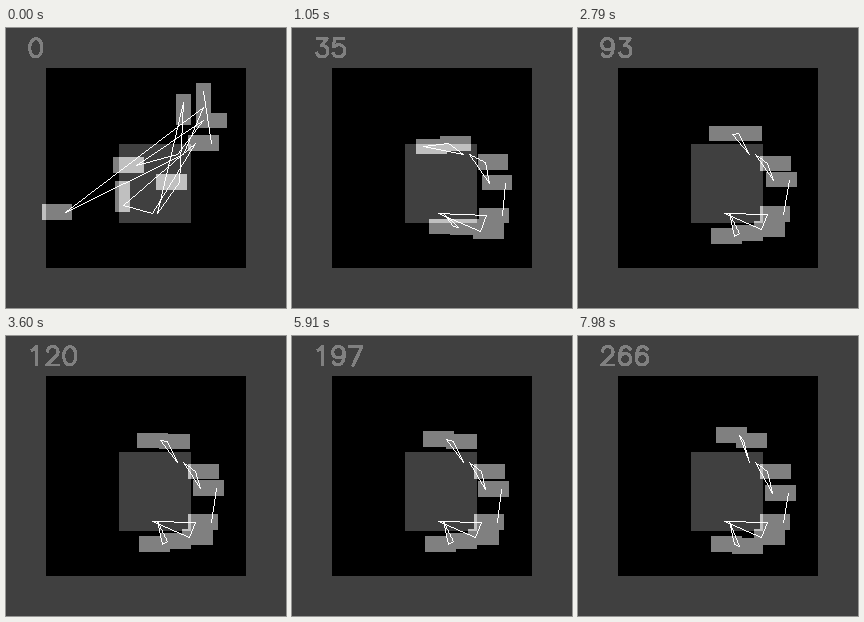
Recreate the animation shown at these times as a matplotlib script. Size 280 px wide and 280 px high, loop 8000 ms.

```python
import numpy as np
import matplotlib
import matplotlib.pyplot as plt
from matplotlib.animation import FuncAnimation

matplotlib.rcParams["toolbar"] = "None"

SIZE, DPI = 280, 100
LOOP, TICK, STEP = 8000, 20, 30      # ms: loop, redraw interval, solver step
STEPS = 267
SPREAD, SETTLED, COOLED, STIRRED = 16, 66, 150, 235   # solver phases
LONG, SHORT, REACH = 30.8, 15.4, 8   # part size, pin distance from centre

# Each part: (x, y[, quarter turns]) at the start, once spread out, at rest
PARTS = dict(
    A=[(107, 129), (86, 184, 2), (131, 95)],
    B=[(190, 84.4), (132, 185), (153.7, 97.4)],
    C=[(35.6, 176, 2), (190, 128), (182, 127.4)],
    D=[(189.6, 55, 1), (190, 142), (186, 145)],
    E=[(182, 107), (183, 173), (181.6, 178)],
    F=[(109, 153, 1), (175, 191), (176, 193)],
    G=[(169.6, 66, 1), (152, 140), (133, 200)],
    H=[(150, 146, 2), (183, 162), (154, 197)],
)
# Loose parts: offset still left when settled, offset gained at the end
DRIFT = dict(A=[(0, 4), (7, -4)], B=[(-1, 0), (4, -1)],
             D=[(3, -2), (1, 4)], H=[(0, 0), (0, 5)])

# Nets join fixed pins (points) and part pins (name + pin number)
NETS = [
    [(171, 126), "A2", "B1"],
    [(177, 126), "C1", "D1"],
    ["D2", "E2"],
    [(146, 185), "E1", "F1"],
    [(151, 185), "G2", "H1"],
]


def ramp(s, a, b):
    return float(np.clip((s - a) / (b - a), 0, 1))


def build_path(name, rng):
    """Pose of one part at every step: big hops first, then ever smaller ones."""
    start, spread, rest = [np.array((*p, 0)[:3], float) for p in PARTS[name]]
    left, gained = np.array(DRIFT.get(name, [(0, 0), (0, 0)]))
    path = np.empty((STEPS, 3))
    for s in range(STEPS):
        if s < SPREAD:
            t = s / SPREAD
            a, b, ease, heat = start, spread, t, 14
        else:
            t = ramp(s, SPREAD, SETTLED)
            a, b, ease, heat = spread, rest, 1 - (1 - t) ** 4, 12 * (1 - t) ** 3
        pos = a[:2] + (b[:2] - a[:2]) * ease
        pos = pos + left * t * (s >= SPREAD) * (1 - ramp(s, SETTLED, COOLED))
        pos = pos + gained * ramp(s, STIRRED, STEPS - 1)
        hop = rng.normal(0, 1, 2) * heat * np.sin(np.pi * t)
        path[s] = *(pos + hop), (a if t < 0.4 else b)[2]
    # pixel fraction that decides how a part's edges round
    path[:, :2] += (0.5, 0.7)
    return path


rng = np.random.default_rng(5)
PATHS = {name: build_path(name, rng) for name in PARTS}


def part_box(name, step):
    x, y, turn = PATHS[name][step]
    w, h = (SHORT, LONG) if turn % 2 else (LONG, SHORT)
    return x, y, w, h, int(turn)


def pin_at(ref, step):
    if not isinstance(ref, str):
        return ref
    x, y, w, h, turn = part_box(ref[0], step)
    dx, dy = [(-1, 0), (0, 1), (1, 0), (0, -1)][turn]
    reach = REACH if ref[1] == "1" else -REACH
    return int(x + w / 2 + dx * reach), int(y + h / 2 + dy * reach)


def draw_line(img, a, b):
    n = max(abs(b[0] - a[0]), abs(b[1] - a[1]), 1)
    xs = np.rint(np.linspace(a[0], b[0], n + 1)).astype(int)
    ys = np.rint(np.linspace(a[1], b[1], n + 1)).astype(int)
    img[ys, xs] = 255


BOARD = np.full((SIZE, SIZE), 64)
BOARD[40:240, 40:240] = 0
BOARD[116:195, 113:185] = 64


def render(step):
    cover = np.zeros((SIZE, SIZE), bool)
    for name in PARTS:
        x, y, w, h, _ = part_box(name, step)
        cover[int(y):int(y + h), int(x):int(x + w)] = True
    img = BOARD + 128 * cover
    for net in NETS:
        pts = [pin_at(ref, step) for ref in net]
        for a, b in zip(pts, pts[1:] + pts[:1]):
            draw_line(img, a, b)
    return img


# Single-stroke digits on a 20 x 21 cell, y upwards
def arc(cx, cy, rx, ry, a0=90, a1=-270):
    a = np.radians(np.linspace(a0, a1, 17))
    return np.column_stack([cx + rx * np.cos(a), cy + ry * np.sin(a)])


def stroke(*pieces):
    return np.vstack([np.atleast_2d(p) for p in pieces])


GAP = (np.nan, np.nan)
SIX = stroke(arc(11, 10.5, 7, 10.5, 45, 180), arc(10.5, 6.5, 6.5, 6.5, 180, -180))
DIGITS = [
    arc(10, 10.5, 7, 10.5),
    stroke((6, 17), (8, 18), (11, 21), (11, 0)),
    stroke(arc(10, 15, 6, 6, 170, -35), (3, 0), (17, 0)),
    stroke((5, 21), (16, 21), (10, 13), arc(10.5, 6.5, 6.5, 6.5, 90, -160)),
    stroke((13, 0), (13, 21), (3, 7), (18, 7)),
    stroke((15, 21), (5, 21), (4, 12), arc(10, 7, 7, 7, 140, -155)),
    SIX,
    stroke((3, 21), (17, 21), (7, 0)),
    stroke(arc(10, 16.5, 6, 4.5), GAP, arc(10, 6, 7, 6)),
    np.array([20, 21]) - SIX,
]


def number_path(n, x=21, base=29, scale=0.88, advance=17):
    rows = []
    for i, ch in enumerate(str(n)):
        g = DIGITS[int(ch)] * scale
        rows += [np.column_stack([x + advance * i + g[:, 0], base - g[:, 1]]), [GAP]]
    return np.vstack(rows)


fig = plt.figure(figsize=(SIZE / DPI, SIZE / DPI), dpi=DPI)
ax = fig.add_axes([0, 0, 1, 1])
ax.axis("off")
view = ax.imshow(render(0), cmap="gray", vmin=0, vmax=255, aspect="auto",
                 interpolation="nearest", extent=(0, SIZE, SIZE, 0))
counter, = ax.plot([], [], color="#808080", lw=2 * 72 / DPI, antialiased=False)
ax.set_xlim(0, SIZE)
ax.set_ylim(SIZE, 0)


def update(k):
    step = min((k * TICK + TICK // 2) // STEP, STEPS - 1)
    view.set_data(render(step))
    counter.set_data(*number_path(step).T)
    return view, counter


anim = FuncAnimation(fig, update, frames=LOOP // TICK, interval=TICK,
                     init_func=lambda: update(0), repeat=True, repeat_delay=0)
plt.show()
```
